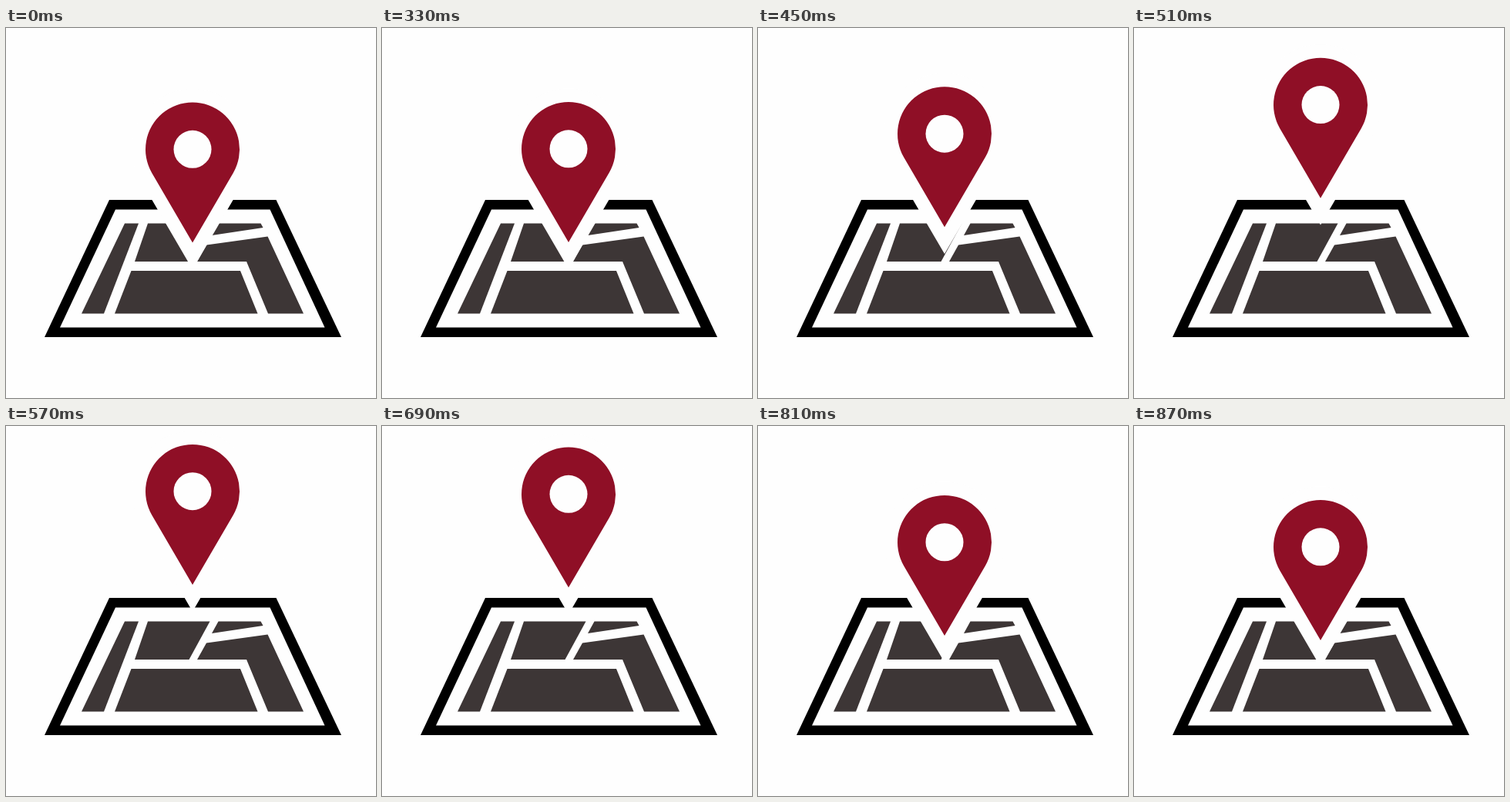
An HTML page that plays this animation: 480 by 480 pixels, repeating every 900 ms.

```html
<!DOCTYPE html>
<html lang="en">
<head>
<meta charset="utf-8">
<title>Map pin</title>
<style>
  html, body { margin: 0; width: 100%; height: 100%; overflow: hidden; background: #fefefe; }
  svg { display: block; width: 100vw; height: 100vh; }
  .paper { fill: #fefefe; }
  .blocks { fill: #3d3636; }
  .halo { fill: #fefefe; stroke: #fefefe; stroke-width: 35; stroke-miterlimit: 4; }
  .body { fill: #8f0f26; }
</style>
</head>
<body>
<svg viewBox="0 0 480 480">
  <defs>
    <path id="drop" d="M242 278.5 L189.2 188 A61 61 0 1 1 294.8 188 Z"/>
  </defs>
  <path d="M134 223 H350.5 L435 401 H50 Z"/>
  <path class="paper" d="M142 235.5 H342.5 L413.5 388.5 H70 Z"/>
  <g class="blocks">
    <path d="M154 253.5 H172 L127 370.5 H98 Z"/>
    <path d="M184 253.5 H264.5 L237.5 303 H167 Z"/>
    <path d="M162.5 315 H304 L326.5 370.5 H141 Z"/>
    <path d="M275.5 253.5 H330.5 L333.5 259 L267 269 Z"/>
    <path d="M260 281.5 L339.5 270.5 L386 370.5 H340 L312 303 H248 Z"/>
  </g>
  <g id="pin">
    <use href="#drop" class="halo"/>
    <use href="#drop" class="body"/>
    <circle class="paper" cx="242" cy="157.3" r="24.5"/>
  </g>
</svg>
<script>
  const LOOP = 900, STEP = 30, START = 330, HEIGHT = 74, REST = 0.5;
  const pin = document.getElementById('pin');

  // Cubic ease-in-out from 0 to 1
  function ease(t, start, duration) {
    const u = Math.min(1, Math.max(0, (t - start) / duration));
    return u < 0.5 ? 4 * u ** 3 : 1 - 4 * (1 - u) ** 3;
  }

  function lift(t) {
    if (t < START) return 0;
    return Math.max(REST, HEIGHT * (ease(t, 334, 284) - ease(t, 623, 260)));
  }

  const begin = performance.now();

  function draw() {
    const time = (performance.now() - begin) % LOOP;
    const t = Math.floor(time / STEP) * STEP;
    pin.setAttribute('transform', `translate(0 ${-lift(t)})`);
    requestAnimationFrame(draw);
  }
  draw();
</script>
</body>
</html>
```
